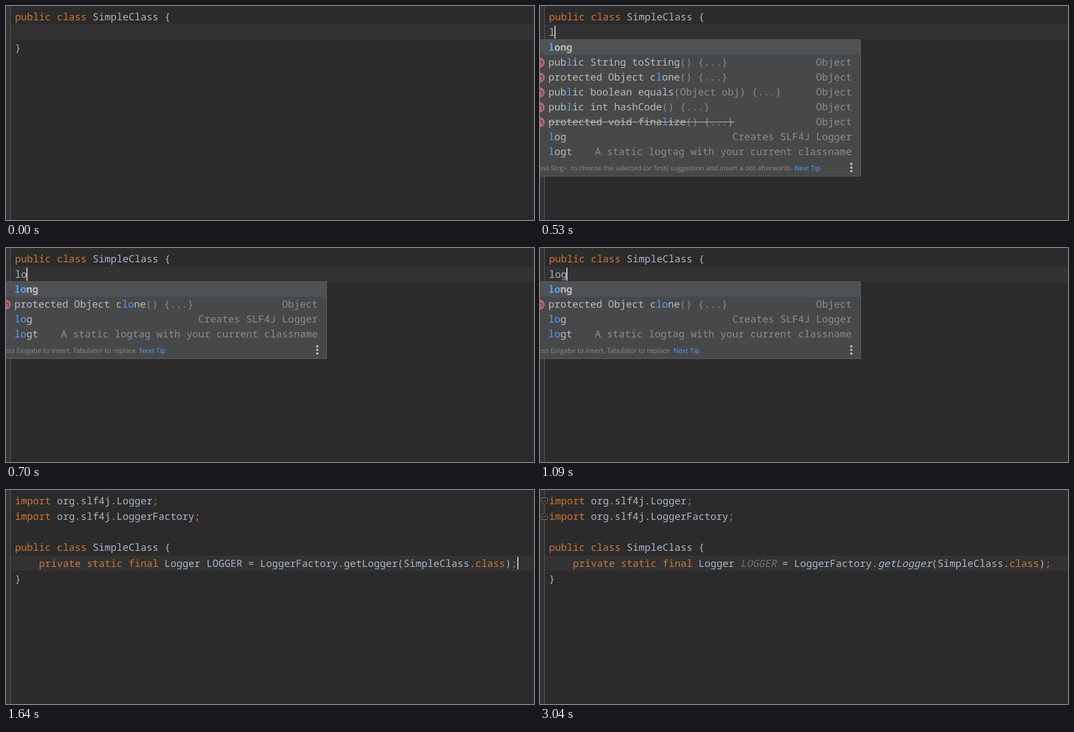
An HTML page for the animation above (3.59 s loop, 882 by 359 pixels).

```html
<!DOCTYPE html>
<html lang="en">
<head>
<meta charset="utf-8">
<title>Live template</title>
<style>
html, body { margin: 0; width: 100%; height: 100%; overflow: hidden; background: #2b2b2b; }
svg { display: block; width: 882px; height: 359px; }
text { white-space: pre; text-rendering: geometricPrecision; }
.code, .list { font: 16.65px "Noto Sans Mono", "DejaVu Sans Mono", monospace; }
.code { fill: #a9b7c6; }
.list { fill: #bbb; }
.k { fill: #cc7832; }
.m { fill: #589df6; }
.g { fill: #8c8c8c; }
.r { fill: #8c8c8c; text-anchor: end; }
.b { font-weight: 700; }
.i { font-style: italic; }
.tip { font: 11.3px "Open Sans", "Noto Sans", sans-serif; fill: #8c8c8c; }
.row { fill: #323232; }
.caret { fill: #bbb; }
.box { fill: #46484a; stroke: #5e6163; }
.sel { fill: #4e5254; }

/* each part is hidden except for its own span of the 3590 ms loop */
.t { visibility: hidden; animation: 3590ms step-end infinite; }
.start { animation-name: start; }
.idle { animation-name: idle; }
.one { animation-name: one; }
.two { animation-name: two; }
.three { animation-name: three; }
.popA { animation-name: popA; }
.popB { animation-name: popB; }
.popC { animation-name: popC; }
.tipOld { animation-name: tipOld; }
.tipNew { animation-name: tipNew; }
.done { animation-name: done; }
.plain { animation-name: plain; }
.styled { animation-name: styled; }
.field { animation-name: field; }
.unused { animation-name: unused; }
.last { animation-name: last; }
@keyframes start { 0% { visibility: visible } 45.68% { visibility: hidden } }
@keyframes idle { 1.949% { visibility: visible } 13.09% { visibility: hidden } }
@keyframes one { 13.09% { visibility: visible } 16.99% { visibility: hidden } }
@keyframes two { 16.99% { visibility: visible } 30.36% { visibility: hidden } }
@keyframes three { 30.36% { visibility: visible } 45.68% { visibility: hidden } }
@keyframes popA { 14.76% { visibility: visible } 19.498% { visibility: hidden } }
@keyframes popB { 19.498% { visibility: visible } 32.45% { visibility: hidden } }
@keyframes popC { 32.45% { visibility: visible } 45.68% { visibility: hidden } }
@keyframes tipOld { 32.45% { visibility: visible } 34.54% { visibility: hidden } }
@keyframes tipNew { 34.54% { visibility: visible } 45.68% { visibility: hidden } }
@keyframes done { 45.68%, to { visibility: visible } }
@keyframes plain { 45.68% { visibility: visible } 54.03% { visibility: hidden } }
@keyframes styled { 54.03%, to { visibility: visible } }
@keyframes field { 54.03% { visibility: visible } 65.18% { visibility: hidden } }
@keyframes unused { 65.18%, to { visibility: visible } }
@keyframes last { 45.68% { visibility: visible } 84.67% { visibility: hidden } }
</style>
</head>
<body>
<svg viewBox="0 0 882 359">
  <defs>
    <g id="method">
      <circle cx="-.5" r="8.5" fill="#b3686e"/>
      <text x="-.5" y="4" text-anchor="middle" font-family="Roboto, sans-serif" font-size="13" fill="#3a3032">m</text>
    </g>
    <g id="dots" fill="#bbb">
      <circle cx="520" cy="-6" r="2"/><circle cx="520" r="2"/><circle cx="520" cy="6" r="2"/>
    </g>
  </defs>

  <rect width="882" height="359" fill="#2b2b2b"/>
  <rect width="7" height="359" fill="#313335"/>
  <rect x="7" width="1" height="359" fill="#555"/>

  <g class="code t start">
    <rect class="row" x="8" y="31" width="874" height="26"/>
    <text x="15" y="24"><tspan class="k">public class </tspan>SimpleClass {</text>
    <text x="15" y="76">}</text>
  </g>
  <rect class="caret t idle" x="15" y="33" width="2" height="22"/>
  <g class="code t one">
    <text x="15" y="50">l</text>
    <rect class="caret" x="24" y="33" width="2" height="22"/>
  </g>
  <g class="code t two">
    <text x="15" y="50">lo</text>
    <rect class="caret" x="34" y="33" width="2" height="22"/>
  </g>
  <g class="code t three">
    <text x="15" y="50">log</text>
    <rect class="caret" x="44" y="33" width="2" height="22"/>
  </g>

  <g class="list t popA">
    <rect class="box" x="-2" y="56.5" width="537.5" height="229"/>
    <rect class="sel" y="57" width="535" height="25"/>
    <use href="#method" y="95"/><use href="#method" y="120"/><use href="#method" y="145"/>
    <use href="#method" y="170"/><use href="#method" y="195"/>
    <text class="b" x="14" y="75"><tspan class="m">l</tspan>ong</text>
    <text x="14" y="100">pub<tspan class="m">l</tspan>ic String toString<tspan class="g">() {...}</tspan></text>
    <text x="14" y="125">protected Object c<tspan class="m">l</tspan>one<tspan class="g">() {...}</tspan></text>
    <text x="14" y="150">pub<tspan class="m">l</tspan>ic boolean equals<tspan class="g">(Object obj) {...}</tspan></text>
    <text x="14" y="175">pub<tspan class="m">l</tspan>ic int hashCode<tspan class="g">() {...}</tspan></text>
    <text x="14" y="200">protected void fina<tspan class="m">l</tspan>ize<tspan class="g">() {...}</tspan></text>
    <rect x="14" y="194" width="311" height="1"/>
    <text x="14" y="225"><tspan class="m">l</tspan>og</text>
    <text x="14" y="250"><tspan class="m">l</tspan>ogt</text>
    <text class="r" x="521" y="100">Object</text>
    <text class="r" x="521" y="125">Object</text>
    <text class="r" x="521" y="150">Object</text>
    <text class="r" x="521" y="175">Object</text>
    <text class="r" x="521" y="200">Object</text>
    <text class="r" x="521" y="225">Creates SLF4J Logger</text>
    <text class="r" x="521" y="250">A static logtag with your current classname</text>
    <text class="tip" x="420" y="276" text-anchor="end">Press Strg+. to choose the selected (or first) suggestion and insert a dot afterwards</text>
    <text class="tip m" x="425" y="276" style="fill:#589df6">Next Tip</text>
    <use href="#dots" y="271"/>
  </g>

  <g class="list t popB">
    <rect class="box" x="-2" y="56.5" width="537.5" height="129"/>
    <rect class="sel" y="57" width="535" height="25"/>
    <use href="#method" y="95"/>
    <text class="b" x="14" y="75"><tspan class="m">lo</tspan>ng</text>
    <text x="14" y="100">protected Object c<tspan class="m">lo</tspan>ne<tspan class="g">() {...}</tspan></text>
    <text x="14" y="125"><tspan class="m">lo</tspan>g</text>
    <text x="14" y="150"><tspan class="m">lo</tspan>gt</text>
    <text class="r" x="521" y="100">Object</text>
    <text class="r" x="521" y="125">Creates SLF4J Logger</text>
    <text class="r" x="521" y="150">A static logtag with your current classname</text>
    <text class="tip" x="217" y="176" text-anchor="end">Press Eingabe to insert, Tabulator to replace</text>
    <text class="tip" x="223" y="176" style="fill:#589df6">Next Tip</text>
    <use href="#dots" y="171"/>
  </g>

  <g class="list t popC">
    <rect class="box" x="-2" y="56.5" width="537.5" height="79"/>
    <rect class="sel" y="57" width="535" height="25"/>
    <text x="14" y="75"><tspan class="m">log</tspan></text>
    <text x="14" y="100"><tspan class="m">log</tspan>t</text>
    <text class="r" x="521" y="75">Creates SLF4J Logger</text>
    <text class="r" x="521" y="100">A static logtag with your current classname</text>
    <use href="#dots" y="121"/>
  </g>
  <g class="tip t tipOld">
    <text x="217" y="126" text-anchor="end">Press Eingabe to insert, Tabulator to replace</text>
    <text class="m" x="223" y="126">Next Tip</text>
  </g>
  <g class="tip t tipNew">
    <text x="420" y="126" text-anchor="end">Press Strg+. to choose the selected (or first) suggestion and insert a dot afterwards</text>
    <text class="m" x="425" y="126">Next Tip</text>
  </g>

  <g class="code t done">
    <rect class="row" x="8" y="110" width="874" height="26"/>
    <text x="15" y="24"><tspan class="k">import </tspan>org.slf4j.Logger<tspan class="k">;</tspan></text>
    <text x="15" y="50"><tspan class="k">import </tspan>org.slf4j.LoggerFactory<tspan class="k">;</tspan></text>
    <text x="15" y="102"><tspan class="k">public class </tspan>SimpleClass {</text>
    <text x="55" y="129"><tspan class="k">private static final </tspan>Logger        = LoggerFactory.         (SimpleClass.<tspan class="k">class</tspan>)<tspan class="k">;</tspan></text>
    <text x="15" y="155">}</text>
  </g>
  <g class="code t plain">
    <text x="335" y="129">LOGGER</text>
    <text x="564.5" y="129">getLogger</text>
  </g>
  <g class="code t styled">
    <text class="i" x="564.5" y="129">getLogger</text>
    <g fill="#2b2b2b" stroke="#6b6e70">
      <path d="M2.5 13.5h10v7l-5 5-5-5zM5 18.5h5"/>
      <path d="M2.5 49.5h10v-7l-5-5-5 5zM5 44.5h5"/>
    </g>
  </g>
  <text class="code i t field" x="335" y="129" style="fill:#9876aa">LOGGER</text>
  <text class="code i t unused" x="335" y="129" style="fill:#72737a">LOGGER</text>
  <rect class="caret t last" x="854" y="112" width="2" height="21"/>
</svg>
</body>
</html>
```
